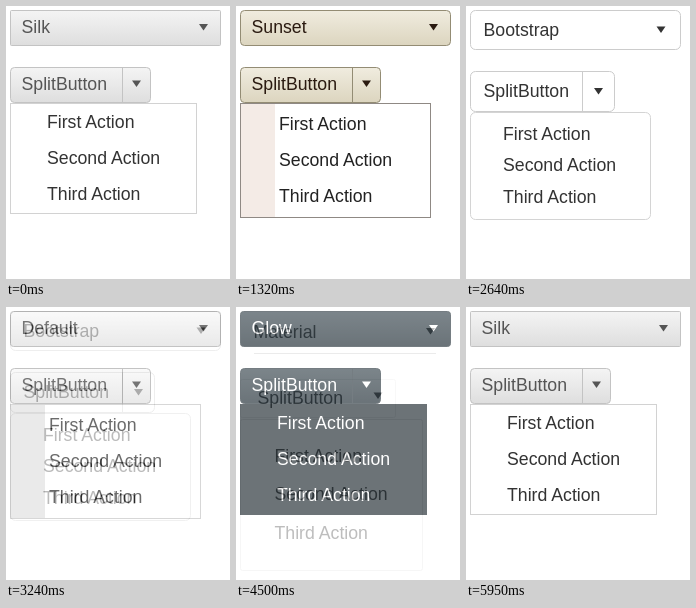
Recreate the animation shown at these times as an HTML page. Size 224x273 px, loop 6.47 s.

```html
<!DOCTYPE html>
<html lang="en">
<head>
<meta charset="utf-8">
<title>Theme switcher</title>
<style>
  html, body { margin: 0; width: 100%; height: 100%; overflow: hidden; background: #fff; }
  svg { position: absolute; left: 0; top: 0; width: 224px; height: 273px; display: block; }
  text { font: 17.7px "Liberation Sans", Arial, sans-serif; }
</style>
</head>
<body>
<script>
const LOOP = 6470, STEP = 70;

// Boxes are [x, y, width, height]; text and arrows are [x, y].
const base = {
  bar: [4, 4, 211, 36], btn: [4, 61, 141, 36], menu: [4, 97, 187, 111],
  divider: 116, barRadius: 2, btnRadius: 4, menuRadius: 0,
  label: [15.5, 27], caption: [15.5, 84], items: [41, 122, 36],
  arrows: [[197.5, 21], [130.5, 77.5]],
  menuFill: '#fff'
};

const ribbed = { menu: [4, 97, 191, 115], items: [43, 124, 36], strip: 35 };

const silk = {
  name: 'Silk', fill: ['#f4f4f4', '#dedede'], line: '#c3c3c3', ink: '#555',
  menuLine: '#d2d2d2', menuInk: '#333', barRadius: 1
};

const themes = [
  { at: 0, ...silk },
  { at: 510, name: 'Simple', ...ribbed, fill: ['#f8f8f8', '#e2e2e2'], line: '#b9b9b9',
    ink: '#111', menuLine: '#a5a5a5', menuInk: '#111', stripFill: '#f0f0f0' },
  { at: 1180, name: 'Sunset', ...ribbed, fill: ['#f0ecdf', '#dcd5bf'], line: '#938c74',
    ink: '#2a1a10', menuLine: '#8f8984', menuInk: '#222', stripFill: '#f4ebe6', barRadius: 4 },
  { at: 1840, name: 'NightUrbanSwipe', fill: ['#252525', '#222'], line: '#424242',
    ink: '#fff', menuLine: '#2c2c2c', menuInk: '#fff', menuFill: '#000', barRadius: 0, btnRadius: 0 },
  { at: 2500, name: 'Bootstrap', fill: ['#fff', '#fff'], line: '#ccc', ink: '#333',
    menuLine: '#d4d4d4', menuInk: '#333',
    bar: [4, 4, 211, 40], btn: [4, 65, 145, 41], menu: [4, 106, 181, 108],
    barRadius: 5, btnRadius: 5, menuRadius: 5,
    label: [17.5, 30], caption: [17.5, 91], items: [37, 134, 31.25],
    arrows: [[195, 23.5], [132.5, 85]] },
  { at: 3170, name: 'Default', ...ribbed, fill: ['#f8f8f8', '#dfdfdf'], line: '#a6a6a6',
    ink: '#303030', menuLine: '#c4c4c4', menuInk: '#222', stripFill: '#e1e1e1', barRadius: 3 },
  { at: 3840, name: 'Glow', fill: ['#3a4850', '#202d35'], line: '#303c43', ink: '#fff',
    menuLine: '#232d33', menuInk: '#fff', menuFill: '#232d33', barRadius: 3 },
  { at: 4500, name: 'Material', fill: ['#fff', '#fff'], line: '#ededed', ink: '#3d3d3d',
    menuLine: '#e6e6e6', menuInk: '#3d3d3d', underline: 'M18 46.5H200',
    btn: [4, 72, 156, 39], menu: [4, 112, 183, 152], btnRadius: 2, menuRadius: 2,
    label: [17.5, 31], caption: [21.5, 97], items: [38.5, 155, 38.4],
    arrows: [[194.5, 24], [142, 88.5]] },
  { at: 5150, name: 'UrbanSwipe', fill: ['#f4f4f4', '#ececec'], line: '#cfcfcf', ink: '#222',
    menuLine: '#d2d2d2', menuInk: '#111', barRadius: 0, btnRadius: 0 },
  { at: 5810, ...silk }
].map(t => ({ ...base, ...t }));

const rect = ([x, y, w, h], r, fill, line) =>
  `<rect x="${x + .5}" y="${y + .5}" width="${w - 1}" height="${h - 1}" rx="${r}" fill="${fill}" stroke="${line}"/>`;

const text = ([x, y], str, fill) => `<text x="${x}" y="${y}" fill="${fill}">${str}</text>`;

const arrow = ([x, y], fill) => `<path d="M${x - 4.5} ${y - 3}h9l-4.5 6.5z" fill="${fill}"/>`;

function draw(t, i) {
  const paint = `url(#fill${i})`;
  const [mx, my, , mh] = t.menu;
  const [ix, iy, pitch] = t.items;
  const out = [
    `<linearGradient id="fill${i}" x2="0" y2="1"><stop stop-color="${t.fill[0]}"/><stop offset="1" stop-color="${t.fill[1]}"/></linearGradient>`,
    '<rect width="224" height="273" fill="#fff"/>'
  ];
  if (t.underline) {
    out.push(`<path d="${t.underline}" stroke="#c4c4c4"/>`);
  } else {
    out.push(rect(t.bar, t.barRadius, paint, t.line));
  }
  out.push(rect(t.btn, t.btnRadius, paint, t.line));
  if (!t.underline) {
    out.push(`<path d="M${t.divider + .5} ${t.btn[1]}v${t.btn[3]}" stroke="${t.line}"/>`);
  }
  out.push(rect(t.menu, t.menuRadius, t.menuFill, t.menuLine));
  if (t.strip) {
    out.push(`<rect x="${mx + 1}" y="${my + 1}" width="${t.strip - 1}" height="${mh - 2}" fill="${t.stripFill}"/>`);
  }
  out.push(text(t.label, t.name, t.ink), text(t.caption, 'SplitButton', t.ink));
  ['First', 'Second', 'Third'].forEach((word, n) =>
    out.push(text([ix, iy + n * pitch], word + ' Action', t.menuInk)));
  t.arrows.forEach(a => out.push(arrow(a, t.ink)));
  return `<svg id="theme${i}" viewBox="0 0 224 273">${out.join('')}</svg>`;
}

// Each layer covers the one below it in three hard steps.
function fade(t, i) {
  if (!i) return '';
  const stops = [1, 2, 3].map((n, k) =>
    `${((t.at + k * STEP - .5) / LOOP * 100).toFixed(4)}%{opacity:${n / 3}}`).join('');
  return `@keyframes fade${i}{0%{opacity:0}${stops}100%{opacity:1}}
    #theme${i}{opacity:0;animation:fade${i} ${LOOP}ms step-end infinite}`;
}

const style = document.createElement('style');
style.textContent = themes.map(fade).join('\n');
document.head.append(style);
document.body.innerHTML = themes.map(draw).join('');
</script>
</body>
</html>
```
